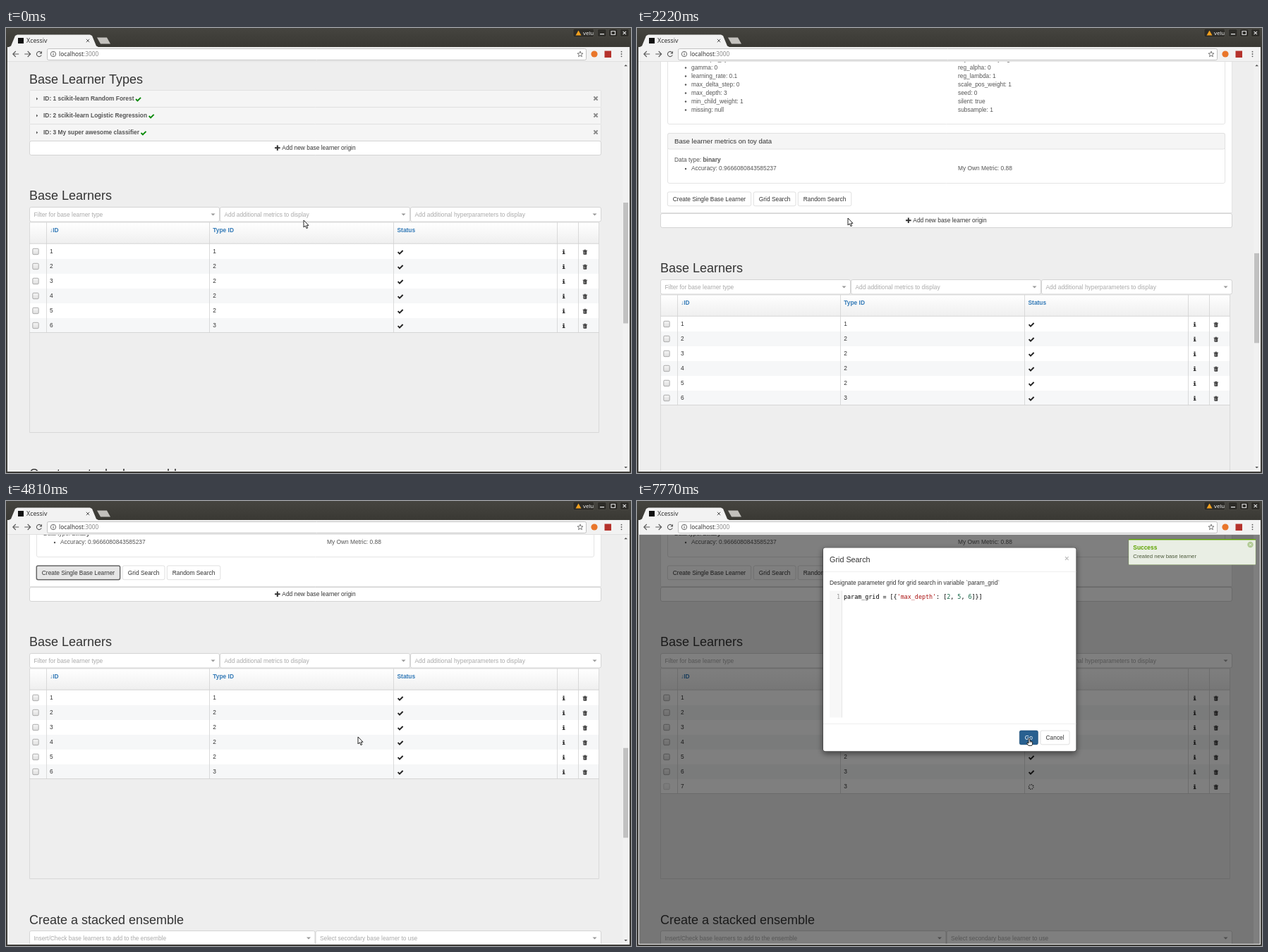
An HTML page with a canvas for the animation above (8 s loop, 886x632 px).

```html
<!DOCTYPE html>
<html lang="en">
<head>
<meta charset="utf-8">
<title>Xcessiv</title>
<style>
html, body { margin: 0; width: 100%; height: 100%; overflow: hidden; background: #eee; }
canvas { display: block; }
</style>
</head>
<body>
<canvas id="stage" width="886" height="632"></canvas>
<script>
const ctx = document.getElementById('stage').getContext('2d');
const SANS = '"Liberation Sans", Arial, sans-serif';
const MONO = '"DejaVu Sans Mono", monospace';
const UI = '"Noto Sans", sans-serif';
const LOOP = 8000, STEP = 370, PANEL_H = 655;

// cursor per step: kind (a arrow, h hand, i beam), x, y
const CURSORS = [
  ['a', 422, 273], ['a', 297, 156], ['h', 300, 156], ['h', 300, 156], ['i', 300, 271],
  ['a', 299, 270], ['a', 299, 270], ['a', 299, 270], ['h', 103, 106], ['h', 103, 106],
  ['a', 410, 224], ['a', 503, 323], ['h', 503, 335], ['a', 499, 335], ['a', 440, 316],
  ['a', 400, 390], ['a', 290, 471], ['h', 232, 128], ['h', 217, 99], ['a', 380, 220],
  ['a', 511, 330], ['h', 556, 337]
];
const ARROW = new Path2D('M0 0V10L2.3 7.9L4 11.6L5.7 10.9L4.1 7.3H7Z');
const HAND = new Path2D('M-1 6V.9Q0-.4 1 .9V4L4 4.7Q4.6 5 4.6 6.2V8.2L3.6 10.4H-1L-3.5 7Q-3.2 5.6-2 6.4L-1 7.2Z');

function text(str, x, cy, o = {}) {
  const size = o.size || 8.4;
  ctx.font = `${o.bold ? 'bold ' : ''}${size}px ${o.font || SANS}`;
  ctx.textAlign = o.align || 'left';
  ctx.fillStyle = o.color || '#333';
  ctx.fillText(str, x, cy + size * 0.347);
  return ctx.measureText(str).width;
}

function code(parts, x, cy) {
  for (const [str, color] of parts) x += text(str, x, cy, { font: MONO, color });
}

function rect(x, y, w, h, fill) {
  ctx.fillStyle = fill;
  ctx.fillRect(x, y, w, h);
}

function box(x, y, w, h, fill, stroke, r = 0, lw = 0.8) {
  ctx.beginPath();
  ctx.roundRect(x, y, w, h, r);
  if (fill) { ctx.fillStyle = fill; ctx.fill(); }
  if (stroke) { ctx.strokeStyle = stroke; ctx.lineWidth = lw; ctx.stroke(); }
}

function lines(color, lw, ...paths) {
  ctx.strokeStyle = color;
  ctx.lineWidth = lw;
  ctx.beginPath();
  for (const p of paths) {
    ctx.moveTo(p[0], p[1]);
    for (let i = 2; i < p.length; i += 2) ctx.lineTo(p[i], p[i + 1]);
  }
  ctx.stroke();
}

function poly(color, ...p) {
  ctx.fillStyle = color;
  ctx.beginPath();
  for (let i = 0; i < p.length; i += 2) ctx.lineTo(p[i], p[i + 1]);
  ctx.fill();
}

function disc(x, y, r, color) {
  ctx.fillStyle = color;
  ctx.beginPath();
  ctx.arc(x, y, r, 0, 7);
  ctx.fill();
}

const cross = (x, y, r, color, lw) =>
  lines(color, lw, [x - r, y - r, x + r, y + r], [x - r, y + r, x + r, y - r]);
const tick = (x, y, color) =>
  lines(color, 1.9, [x - 3.4, y, x - 1, y + 2.4, x + 3.6, y - 2.2]);

function buttonWidth(label) {
  ctx.font = `8.4px ${SANS}`;
  return ctx.measureText(label).width + 15.6;
}

function button(label, x, y, state) {
  const [fill, edge] = {
    hover: ['#e6e6e6', '#adadad'], focus: ['#e6e6e6', '#666'], active: ['#d4d4d4', '#555'],
    primary: ['#337ab7', '#2e6da4'], dark: ['#286090', '#204d74']
  }[state] || ['#fff', '#ccc'];
  const w = buttonWidth(label);
  const strong = state === 'focus' || state === 'active';
  box(x + 0.3, y + 0.3, w - 0.6, 19.8, fill, edge, 2.2, strong ? 1.5 : 0.6);
  const white = state === 'primary' || state === 'dark';
  text(label, x + 7.8, y + 10.2, { color: white ? '#fff' : '#333' });
}

function select(label, x, y, w) {
  box(x, y + 0.5, w, 20.5, '#fff', '#ccc', 2.4);
  text(label, x + 6, y + 11, { color: '#aaa' });
  const cx = x + w - 9;
  poly('#999', cx - 3, y + 9.6, cx + 3, y + 9.6, cx, y + 12.6);
}

function accordionRow(label, x, y, w, opened) {
  box(x + 0.5, y + 0.5, w, 24, '#f5f5f5', '#ddd', 1);
  const cx = x + 11, cy = y + 12.5;
  if (opened) poly('#555', cx - 2, cy - 1, cx + 2, cy - 1, cx, cy + 1.2);
  else poly('#555', cx - 1, cy - 2, cx - 1, cy + 2, cx + 1.2, cy);
  return text(label, x + (w > 800 ? 20 : 17.5), y + 12.5, { bold: true, color: '#555' });
}

function panel(title, y, h) {
  box(43.5, y + 0.5, 790, h, '#fff', '#ddd', 2.4);
  box(43.5, y + 0.5, 790, 22.5, '#f5f5f5', '#ddd', 2.4);
  text(title, 53, y + 11.5, { size: 9.6 });
}

function bullet(str, cy) {
  disc(69, cy + 0.5, 1.2, '#555');
  text(str, 77, cy, { color: '#555' });
}

function gutter(x, y, count) {
  rect(x, y, 18, 180, '#f7f7f7');
  rect(x + 17.4, y, 0.6, 180, '#ddd');
  for (let i = 0; i < count; i++)
    text(i + 1, x + 15, y + 8.5 + 12 * i, { font: MONO, color: '#999', align: 'right' });
}

function typesList(open) {
  text('Base Learner Types', 33, 73, { size: 18 });
  ['scikit-learn Random Forest', 'scikit-learn Logistic Regression', 'My super awesome classifier']
    .forEach((name, i) => {
      const y = 88 + i * 24;
      const w = accordionRow(`ID: ${i + 1} ${name}`, 33, y, 810, open && i === 2);
      tick(59 + w, y + 13, '#080');
      cross(836, y + 12, 2.6, '#888', 2);
    });
}

function details(k) {
  box(33.5, 160.5, 810, 654, '#fff', '#ddd');
  rect(34, 159.5, 809, 2, '#fff');
  text('My super awesome classifier', 43, 179.5, { size: 14.4, color: '#555' });
  box(43.5, 193.5, 790, 31, '#dff0d8', '#d6e9c6', 2.4);
  text('This base learner setup has been finalized and can no longer be modified.', 53, 209, { color: '#3c763d' });

  gutter(43, 236.5, 3);
  code([['from', '#708'], [' xgboost ', '#000'], ['import', '#708'], [' XGBClassifier', '#000']], 63.5, 245);
  code([['base_learner = XGBClassifier()', '#000']], 63.5, 269);

  text('Meta-feature generator method', 43, 422, { bold: true, color: '#555' });
  box(43.5, 431.5, 790, 20, '#eee', '#ccc', 2.4);
  text('predict_proba', 51, 441.5, { color: '#555' });
  text('Metrics to be calculated from meta-features', 43, 466, { size: 10.8, color: '#555' });
  accordionRow('Accuracy', 43, 477.5, 790);
  accordionRow('My Own Metric', 43, 501, 790);

  panel('Base learner default hyperparameters', 534, 154);
  ['base_score: 0.5', 'colsample_bylevel: 1', 'colsample_bytree: 1', 'gamma: 0', 'learning_rate: 0.1',
    'max_delta_step: 0', 'max_depth: 3', 'min_child_weight: 1', 'missing: null']
    .forEach((s, i) => bullet(s, 572 + 12 * i));
  ['n_estimators: 100', 'nthread: -1', 'objective: binary:logistic', 'reg_alpha: 0', 'reg_lambda: 1',
    'scale_pos_weight: 1', 'seed: 0', 'silent: true', 'subsample: 1']
    .forEach((s, i) => text(s, 455, 572 + 12 * i, { color: '#555' }));

  panel('Base learner metrics on toy data', 701, 71);
  const w = text('Data type: ', 53, 739.5, { color: '#555' });
  text('binary', 53 + w, 739.5, { bold: true, color: '#555' });
  bullet('Accuracy: 0.9666080843585237', 751.5);
  text('My Own Metric: 0.88', 455, 751.5, { color: '#555' });

  const single = k === 8 ? 'hover' : k === 9 ? 'active' : k >= 13 && k <= 17 ? 'focus' : '';
  button('Create Single Base Learner', 43, 784.6, single);
  button('Grid Search', 165, 784.6, k === 18 ? 'active' : '');
  button('Random Search', 228, 784.6);
}

function trash(x, y) {
  rect(x - 3, y - 2.6, 6.2, 1, '#222');
  rect(x - 1.2, y - 3.5, 2.6, 0.9, '#222');
  box(x - 2.3, y - 1.5, 4.8, 5, '#222', null, 0.8);
  for (const dx of [-1.1, 0.1, 1.3]) rect(x + dx - 0.3, y - 0.7, 0.6, 3.2, '#bbb');
}

function spinner(x, y, k) {
  for (let i = 0; i < 8; i++) {
    const a = (i + (k % 4) * 0.3) * Math.PI / 4;
    disc(x + 3.3 * Math.cos(a), y + 3.3 * Math.sin(a), 0.65 + (i % 4) * 0.08, '#333');
  }
}

function tableRow(id, type, k) {
  const y = 307 + (id - 1) * 21, cy = y + 10.5, pending = id === 7;
  rect(33, y, 808, 21, id % 2 ? '#fff' : '#f6f7f8');
  const g = ctx.createLinearGradient(0, cy - 4, 0, cy + 5);
  g.addColorStop(0, '#f5f5f5');
  g.addColorStop(1, '#dcdcdc');
  ctx.globalAlpha = pending ? 0.4 : 1;
  box(37.8, cy - 4.2, 8.4, 8.4, g, '#999', 1.4);
  ctx.globalAlpha = 1;
  text(id, 62, cy);
  text(type, 293.3, cy);
  if (pending) spinner(558.7, cy + 0.5, k);
  else tick(559, cy + 0.7, '#222');
  rect(789.5, cy - 2.8, 2, 1.7, '#222');
  rect(789, cy - 0.3, 2.5, 1, '#222');
  rect(789.8, cy - 0.3, 1.7, 3.6, '#222');
  rect(788.8, cy + 2.6, 3.7, 1, '#222');
  trash(820.7, cy + 0.8);
}

function learners(k) {
  box(33.5, 160.5, 810, 20, k === 17 ? '#e6e6e6' : '#fff', k === 17 ? '#adadad' : '#ccc', 2.4);
  lines('#333', 2, [381, 170.3, 388.6, 170.3], [384.8, 166.5, 384.8, 174.1]);
  text('Add new base learner origin', 391.3, 170.5);

  text('Base Learners', 33, 238, { size: 18 });
  select('Filter for base learner type', 33.5, 254, 269);
  select('Add additional metrics to display', 303.5, 254, 269);
  select('Add additional hyperparameters to display', 573.5, 254, 270);

  const g = ctx.createLinearGradient(0, 276, 0, 306);
  g.addColorStop(0, '#fff');
  g.addColorStop(1, '#efefef');
  rect(33, 276, 808, 30, g);
  [['↓ID', 62], ['Type ID', 293.3], ['Status', 554.5]]
    .forEach(([s, x]) => text(s, x, 287.5, { bold: true, color: '#337ab7' }));
  const count = k >= 15 ? 7 : 6;
  for (let id = 1; id <= count; id++) tableRow(id, id === 1 ? 1 : id < 6 ? 2 : 3, k);
  const end = 307 + count * 21;
  rect(33, 305.7, 808, 0.8, '#d3d3d3');
  rect(33, end - 1, 808, 0.9, '#d3d3d3');
  for (const x of [57, 288, 549, 781, 811]) rect(x, 276, 0.8, end - 276, '#d3d3d3');
  box(33.5, 276, 807, 298.5, null, '#d3d3d3');

  text('Create a stacked ensemble', 33, 632.5, { size: 18 });
  select('Insert/Check base learners to add to the ensemble', 33.5, 648, 404.5);
  select('Select secondary base learner to use', 439, 648, 404.5);
}

function scrollbar(open, scroll) {
  rect(874, 48, 9, 581, '#f1f1f1');
  if (open) rect(875, 199 + scroll * 0.219, 7, 127.5, '#c1c1c1');
  else rect(875, 248, 7, 171.5, '#c1c1c1');
  poly('#505050', 876.3, 54.3, 881, 54.3, 878.6, 52);
  poly('#505050', 876.3, 623, 881, 623, 878.6, 625.3);
}

function modal(k) {
  const grid = k >= 19;
  rect(3, 48, 880, 581, 'rgba(0,0,0,.5)');
  ctx.save();
  ctx.translate(0, k === 10 ? -1 : k === 19 ? -10 : 0);
  ctx.shadowColor = 'rgba(0,0,0,.5)';
  ctx.shadowBlur = 9;
  ctx.shadowOffsetY = 3;
  box(263.4, 66, 359.6, 289.8, '#444', null, 3.6);
  ctx.shadowColor = 'transparent';
  box(264, 66.6, 358.4, 288.6, '#fff', null, 3);
  text(grid ? 'Grid Search' : 'Create base learner', 273, 83.3, { size: 10.8 });
  cross(609.3, 81.5, 2.3, '#bbb', 1.2);
  rect(264, 100, 358.4, 0.6, '#e5e5e5');
  text(grid ? 'Designate parameter grid for grid search in variable `param_grid`'
    : 'Enter parameters to use for base learner in variable `params`', 273, 115.6);
  gutter(273, 127.5, 1);
  const parts = grid
    ? [['param_grid = [{'], ["'max_depth'", '#a11'], [': ['], ['2', '#164'], [', '], ['5', '#164'], [', '], ['6', '#164'], [']}]']]
    : [['params = {'], ["'n_estimators'", '#a11'], [': '], ['88', '#164'], ['}']];
  code(parts.map(([s, c]) => [s, c || '#000']), 293, 136);
  rect(264, 316.2, 358.4, 0.6, '#e5e5e5');
  const cancelX = 613.4 - buttonWidth('Cancel');
  const action = grid ? 'Go' : 'Create single base learner';
  button(action, cancelX - 3 - buttonWidth(action), 325.8, k === 12 || k === 21 ? 'dark' : 'primary');
  button('Cancel', cancelX, 325.8);
  ctx.restore();
}

function toast(x) {
  box(x, 54.5, 180, 36, 'rgba(240,245,234,.95)', 'rgba(94,164,0,.35)', 1, 0.6);
  rect(x, 54, 180, 1.4, '#5ea400');
  text('Success', x + 6.3, 66, { bold: true, color: '#5ea400' });
  text('Created new base learner', x + 6.3, 78.7, { size: 7.8, color: '#4b583a' });
  disc(x + 172.5, 62, 4.2, '#b0ca92');
  cross(x + 172.5, 62, 1.5, '#f0f5ea', 1);
}

function browser() {
  const g = ctx.createLinearGradient(0, 0, 0, 27);
  g.addColorStop(0, '#45443f');
  g.addColorStop(1, '#3a3934');
  rect(0, 0, 886, 632, '#3c3b37');
  rect(0, 0, 886, 27, g);
  poly('#f2f2f2', 4, 27, 7, 25.5, 13, 11, 16, 9.5, 119, 9.5, 122, 11, 128, 25.5, 131, 27);
  poly('#c3c1bd', 129, 13.5, 143, 13.5, 148, 22.5, 134, 22.5);
  rect(17, 14, 8, 8, '#111');
  text('Xcessiv', 29, 17.5, { size: 8.8, font: UI });
  cross(116, 18, 2.2, '#555', 1);

  box(804, 1, 29.5, 12, '#2d2c28', '#55534c', 2, 0.6);
  poly('#f2a01e', 811.5, 3.5, 815.5, 10.5, 807.5, 10.5);
  text('velu', 818, 7, { size: 7.8, font: UI, color: '#eee' });
  for (const x of [838.5, 854.5, 870.5]) box(x, 1.5, 12.5, 11, '#2d2c28', '#55534c', 2, 0.6);
  rect(842, 8, 6, 1.3, '#ddd');
  box(858, 4.5, 5.5, 5, null, '#ddd', 0, 1.1);
  cross(876.8, 7, 2.2, '#ddd', 1.2);

  // toolbar and the light edge around the page
  rect(2, 27, 882, 603, '#f2f2f2');
  rect(2, 47, 882, 1, '#e0e0e0');
  box(58.5, 29.5, 764, 16, '#fff', '#b5b5b5', 2);
  const grey = '#5a5a5a';
  lines(grey, 1.1, [18.2, 37, 10, 37], [13.8, 33, 9.8, 37, 13.8, 41],
    [26.3, 37, 34.5, 37], [30.7, 33, 34.7, 37, 30.7, 41]);
  ctx.beginPath();
  ctx.arc(47, 37, 3.6, 0.4, 5.4);
  ctx.stroke();
  poly(grey, 51, 32.8, 51, 36.5, 47.3, 36.5);
  ctx.lineWidth = 0.9;
  ctx.beginPath();
  ctx.arc(67, 37, 3.7, 0, 7);
  ctx.stroke();
  rect(66.5, 36.3, 1, 2.8, grey);
  rect(66.5, 34.6, 1, 1, grey);
  const w = text('localhost', 75, 37, { size: 8.3, font: UI });
  text(':3000', 75 + w, 37, { size: 8.3, font: UI, color: '#888' });

  const star = [];
  for (let i = 0; i <= 10; i++) {
    const r = i % 2 ? 1.8 : 4.2, a = i * Math.PI / 5;
    star.push(814 + r * Math.sin(a), 37.3 - r * Math.cos(a));
  }
  lines(grey, 0.8, star);
  disc(834, 37, 4.6, '#e9762b');
  rect(848.5, 32.5, 9.5, 9.5, '#b5322c');
  for (const y of [33.7, 37, 40.3]) disc(872.5, y, 0.9, grey);
}

function cursor([kind, x, y]) {
  ctx.save();
  ctx.translate(x, y);
  ctx.lineJoin = 'round';
  if (kind === 'i') {
    const shape = [[-2, -4.5, 2, -4.5], [0, -4.5, 0, 4.5], [-2, 4.5, 2, 4.5]];
    lines('#fff', 2.4, ...shape);
    lines('#111', 1.2, ...shape);
  } else {
    const path = kind === 'a' ? ARROW : HAND;
    ctx.fillStyle = '#fff';
    ctx.strokeStyle = '#111';
    ctx.lineWidth = 0.9;
    ctx.fill(path);
    ctx.stroke(path);
    if (kind === 'h') lines('#111', 0.6, [1, 4, 1, 6.5], [3, 4.7, 3, 6.7]);
  }
  ctx.restore();
}

function draw(time) {
  const k = Math.floor((time % LOOP) / STEP);
  const open = k >= 3;
  const scroll = k < 4 ? 0 : [5, 488, 552, 693][Math.min(k - 4, 3)];
  const dialog = (k >= 10 && k <= 12) || k >= 19;

  browser();
  ctx.save();
  ctx.beginPath();
  ctx.rect(3, 48, 880, 581);
  ctx.clip();
  rect(3, 48, 880, 581, '#eee');
  ctx.save();
  ctx.translate(0, -scroll);
  typesList(open);
  if (open) {
    details(k);
    ctx.translate(0, PANEL_H);
  }
  learners(k);
  ctx.restore();
  if (dialog) {
    rect(874, 48, 9, 581, '#fff');
    modal(k);
  } else {
    scrollbar(open, scroll);
  }
  if (k >= 15) toast(k === 15 ? 694 : dialog ? 697 : 688);
  cursor(CURSORS[k]);
  ctx.restore();
}

const start = performance.now();
function tickFrame() {
  draw(performance.now() - start);
  requestAnimationFrame(tickFrame);
}
tickFrame();
</script>
</body>
</html>
```
